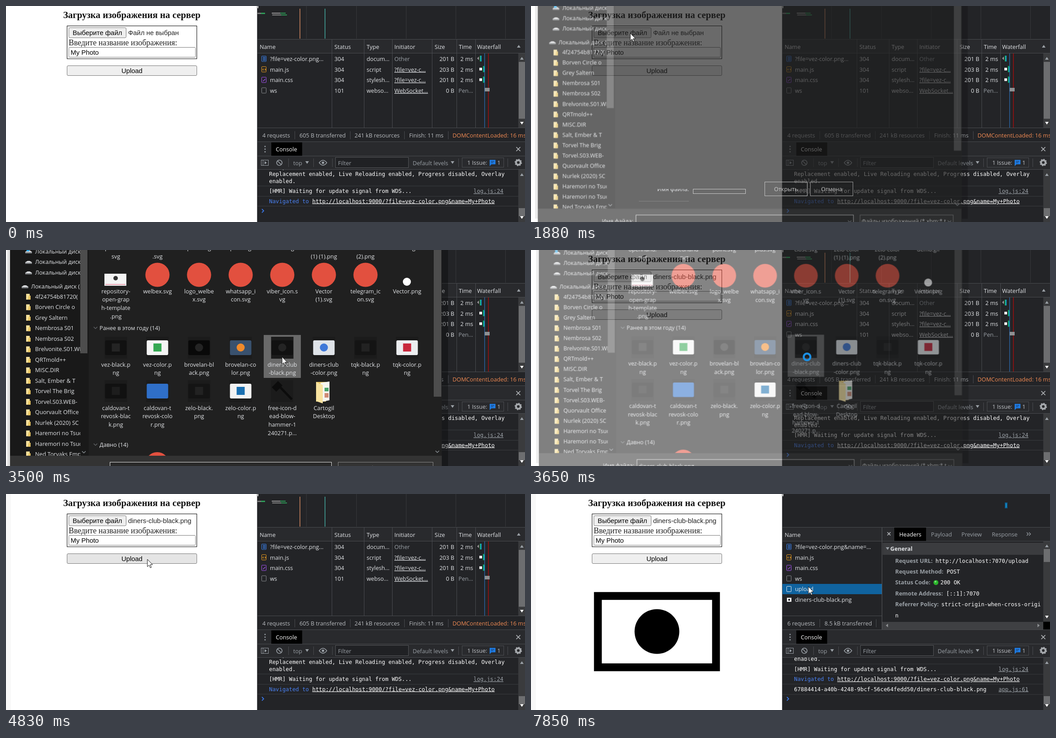
Write an HTML page that moves like this. It is 1160 by 483 pixels and loops after 8000 ms.

```html
<!DOCTYPE html>
<html lang="ru">
<head>
<meta charset="utf-8">
<title>Загрузка изображения</title>
<style>
html, body { margin: 0; width: 100%; height: 100%; overflow: hidden; background: #fff; }
svg { display: block; width: 100vw; height: 100vh; }
text { white-space: pre; }
.ui { font: 12.7px "Open Sans", "Noto Sans", sans-serif; }
.mono { font: 12.32px "DejaVu Sans Mono", monospace; }
.form { font: 14.88px "Liberation Sans", Arial, sans-serif; }
.serif { font: 17.86px "Liberation Serif", serif; }
.title { font: bold 20.9px "Liberation Serif", serif; }
.bold { font-weight: 700; }
.link { text-decoration: underline; }
</style>
</head>
<body>
<svg id="stage" viewBox="0 0 1160 483" xmlns="http://www.w3.org/2000/svg"></svg>
<script>
const LOOP = 8000;
const BG = '#232427', BAR = '#292a2d', LINE = '#4a4c50', TEXT = '#e3e5e8', DIM = '#9aa0a6';

// Drawing helpers
const rect = (x, y, w, h, fill, more = '') => `<rect x="${x}" y="${y}" width="${w}" height="${h}" fill="${fill}" ${more}/>`;
const box = (x, y, w, h, stroke, fill = 'none', r = 0, more = '') => rect(x, y, w, h, fill, `stroke="${stroke}" rx="${r}" ${more}`);
const path = (d, fill, more = '') => `<path d="${d}" fill="${fill}" ${more}/>`;
const stroke = (d, color, width = 1) => path(d, 'none', `stroke="${color}" stroke-width="${width}"`);
const disc = (x, y, r, fill, more = '') => `<circle cx="${x}" cy="${y}" r="${r}" fill="${fill}" ${more}/>`;
const text = (x, y, str, fill = TEXT, cls = 'ui', anchor = 'start') =>
  `<text x="${x}" y="${y}" fill="${fill}" class="${cls}" text-anchor="${anchor}">${str}</text>`;
const group = (id, body) => `<g id="${id}">${body}</g>`;
const clipped = (id, body) => `<g clip-path="url(#${id})">${body}</g>`;
const down = (x, y, fill = DIM) => path(`M${x - 4} ${y - 3}h8l-4 6z`, fill);
const up = (x, y, fill = DIM) => path(`M${x - 4} ${y + 3}h8l-4 -6z`, fill);
const chevron = (x, y, color = DIM) => stroke(`M${x - 4} ${y - 2}l4 4 4 -4`, color, 1.2);
const vlines = (xs, y, h, color = LINE) => stroke(xs.map(x => `M${x}.5 ${y}v${h}`).join(''), color);
const hlines = (ys, x, w, color = LINE) => stroke(ys.map(y => `M${x} ${y}.5h${w}`).join(''), color);
const cross = (x, y, r = 4.5) => stroke(`M${x - r} ${y - r}l${2 * r} ${2 * r}m0 ${-2 * r}l${-2 * r} ${2 * r}`, '#b5b8bc', 1.7);
const scrollbar = (y, h, thumbY, thumbH) =>
  rect(1145, y, 15, h, '#3a3b3d') + rect(1146, thumbY, 14, thumbH, '#6d6e70') + up(1153, y + 11) + down(1153, y + h - 10, '#fff');

// Left: the upload form
const page = rect(0, 0, 562, 483, '#fff') + group('edge', rect(0, 0, 11, 483, '#f8f8f8')) +
  text(127.7, 27, 'Загрузка изображения на сервер', '#111', 'title') +
  box(136.5, 44.5, 290, 73.5, '#000') +
  box(140.5, 48.5, 128, 22.5, '#767676', '#efefef', 2.5, 'id="choose"') +
  text(149, 65, 'Выберите файл', '#000', 'form') +
  group('noFile', text(273, 65, 'Файл не выбран', '#222', 'form')) +
  group('picked', text(273, 65, 'diners-club-black.png', '#222', 'form')) +
  text(140, 87.5, 'Введите название изображения:', '#222', 'serif') +
  box(140.5, 92.5, 283, 22, '#767676', '#fff', 2) + text(144.5, 109, 'My Photo', '#000', 'form') +
  box(136.5, 133.5, 290, 22, '#767676', '#efefef', 2.5, 'id="send"') +
  text(281.5, 150, 'Upload', '#000', 'form', 'middle') +
  group('image', rect(149.5, 228, 264, 159.5, '#fff', 'stroke="#000" stroke-width="17.5"') + disc(281.5, 307.5, 50, '#000'));

// Right: network panel
const rowY = i => 118.5 + i * 23.6;
const fileIcon = i => {
  const y = rowY(i) - 6.5, color = ['#3b82f0', '#f0a020', '#a855f7', '#8a8d91', '#8a8d91', '#fff'][i];
  if (i === 5) return rect(572, y + 2, 10, 9, '#fff') + rect(575, y + 4.5, 4, 4, BG);
  const detail = ['M574 3.5h6M574 6.5h6M574 9.5h6', 'M575.5 5l-1.5 2 1.5 2M578.5 5l1.5 2 -1.5 2', 'M574.5 9.5l5 -5'][i];
  return box(571.5, y, 10, 12, color, 'none', 1) +
    (detail ? `<g transform="translate(0 ${y - .5})">${stroke(detail, color, 1.3)}</g>` : '');
};
const names = ['?file=vez-color.png...', 'main.js', 'main.css', 'ws', 'upload', 'diners-club-black.png'];
const nameCell = (i, label = names[i]) => fileIcon(i) + text(590, rowY(i) + 4.5, label);
const rows = [
  ['304', 'docum...', 'Other', '201 B', '2 ms'],
  ['304', 'script', '?file=vez-c...', '203 B', '2 ms'],
  ['304', 'stylesh...', '?file=vez-c...', '201 B', '2 ms'],
  ['101', 'webso...', 'WebSocket...', '0 B', 'Pen...'],
  ['200', 'xhr', 'app.js:67', '254 B', '3 ms'],
  ['200', 'png', 'app.js:62', '7.6 kB', '2 ms']
];
const row = ([status, type, from, size, time], i) => {
  const y = rowY(i) + 4.5, other = from === 'Other';
  return nameCell(i) + text(734, y, status) + text(806, y, type) +
    text(868, y, from, other ? DIM : TEXT, other ? 'ui' : 'ui link') +
    text(1002, y, size, TEXT, 'ui', 'end') + text(1044, y, time, i === 3 ? DIM : TEXT, 'ui', 'end');
};
const summary = (...parts) => parts.map(([x, label, sep]) =>
  text(x, 294, label, label.startsWith('DOM') ? '#f28b54' : '#b9bcc0') + (sep ? vlines([sep], 280, 18) : '')).join('');

const overviewBefore = vlines([671, 783, 894, 1005, 1116], 0, 73, '#38393c') +
  rect(656, 6, 2, 67, '#a86f52') + rect(712, 6, 2, 67, '#3c8a84') +
  rect(562, 15, 8, 3, '#777') + rect(570, 15, 9, 3, '#2e9b57') +
  rect(594, 15, 19, 2, '#999') + rect(595, 19, 20, 2, '#888') + rect(613, 15, 12, 2, '#2e9b57') + rect(615, 19, 13, 2, '#2e9b57');
const waterfallBefore = rect(1069, 106, 1.5, 167, '#2a629f') + rect(1077.5, 106, 1.5, 167, '#a30d0d') +
  path('M1053 117l4 -4v8z', '#999') + rect(1059, 111, 2, 13, '#1bb16a') + rect(1061, 111, 2, 13, '#1593c9') +
  [1, 2].map(i => rect(1058, rowY(i) - 4, 6, 6, '#fff') + rect(1066, rowY(i) - 8, 3, 14, '#12a86b') + rect(1068, rowY(i) - 6, 2, 11, '#1593c9')).join('') +
  rect(1070, 183, 11, 8, '#8e9092');
const before = overviewBefore + rows.slice(0, 4).map(row).join('') + waterfallBefore +
  summary([573, '4 requests', 645], [656, '605 B transferred', 769], [779, '241 kB resources', 890],
    [901, 'Finish: 11 ms', 988], [998, 'DOMContentLoaded: 16 ms']);
const after = vlines([692, 823, 954, 1085], 0, 73, '#38393c') + rect(562, 5, 2, 68, '#3f8a82') + rows.map(row).join('') +
  rect(1053.5, 106, 2, 167, '#a30d0d') +
  [0, 1, 2].map(i => rect(1053, rowY(i) - 4, 3, 6, '#6b6d70') + rect(1058.5, rowY(i) - 8, 2.5, 13, '#1593c9')).join('') +
  [4, 5].map(i => rect(1140, rowY(i) - 5, 2, 6, '#ddd')).join('') +
  summary([573, '6 requests', 645], [656, '8.5 kB transferred', 771], [782, '248 kB resources', 893],
    [903, 'Finish: 19.08 s', 996], [1006, 'DOMContentLoaded: 16 ms']);

const headers = [['Request URL:', 904, 'http://localhost:7070/upload'], ['Request Method:', 929, 'POST'],
  ['Status Code:', 915, '200 OK'], ['Remote Address:', 928, '[::1]:7070'],
  ['Referrer Policy:', 917, 'strict-origin-when-cross-origi'], ['', 814, 'n']];
const details = rect(562, 75, 598, 228, BG) + rect(562, 75, 598, 30, BAR) +
  rect(562, 201, 222, 23, '#10639f') + text(567, 95.5, 'Name') +
  names.map((n, i) => nameCell(i, i ? n : '?file=vez-color.png&amp;name=...')).join('') + box(571.5, 206.5, 10, 12, '#dfe9f2', 'none', 1) +
  summary([573, '6 requests', 645], [656, '8.5 kB transferred', 771]) +
  rect(812, 75, 71, 30, '#000') + cross(800, 89, 3.5) +
  [['Headers', 823], ['Payload', 894], ['Preview', 962], ['Response', 1030]].map(([s, x], i) => text(x, 94.5, s, i ? DIM : '#fff')).join('') +
  stroke('M1108 86l3.5 3.5 -3.5 3.5M1113 86l3.5 3.5 -3.5 3.5', DIM, 1.4) +
  rect(786, 109, 359, 27, '#3b3c3f') + down(797, 122) + text(803, 127, 'General', TEXT, 'ui bold') +
  headers.map(([key, x, value], i) => text(814, 153.5 + i * 24.4, key, DIM, 'ui bold') + text(x, 153.5 + i * 24.4, value, '#fff', 'mono')).join('') +
  disc(905, 198, 5.5, '#2bb52b') + disc(904, 196, 2, '#7be27b') +
  scrollbar(105, 180, 123, 29) + rect(785, 286, 360, 17, '#3f4043') + rect(1145, 286, 15, 17, '#000') +
  path('M798 290v8l-5 -4zM1132 290v8l5 -4z', '#8d8f92') + vlines([784], 75, 228, '#5a5c5f') +
  hlines([74, 105], 562, 598) + hlines([272], 562, 222) + rect(1059, 19, 6, 13, '#0d5b8e') + rect(1061, 21, 2, 9, '#1593c9');

// Right: console drawer
const consoleLog = text(588, 364, '[webpack-dev-server] Server started: Hot Module', '#fff', 'mono') +
  text(588, 380, 'Replacement enabled, Live Reloading enabled, Progress disabled, Overlay', '#fff', 'mono') +
  text(588, 395.5, 'enabled.', '#fff', 'mono') + hlines([402, 425, 447], 562, 583, '#3a3c3f') +
  text(588, 418, '[HMR] Waiting for update signal from WDS...', '#fff', 'mono') + text(1045, 418, 'log.js:24', DIM, 'mono link') +
  text(588, 440.5, 'Navigated to', '#4a80f0', 'mono') +
  text(684.5, 440.5, 'http://localhost:9000/?file=vez-color.png&amp;name=My+Photo', '#fff', 'mono link') +
  group('answer', text(588, 463, '67884414-a40b-4248-9bcf-56ce64fedd50/diners-club-black.png', '#fff', 'mono') +
    text(1045, 463, 'app.js:61', DIM, 'mono link') + hlines([470], 562, 583, '#3a3c3f'));
const gear = disc(1145, 350, 5, 'none', 'stroke="#a5a8ac" stroke-width="4"') +
  disc(1145, 350, 7, 'none', 'stroke="#a5a8ac" stroke-width="2.5" stroke-dasharray="2.75 2.75"');
const drawer = rect(562, 303, 598, 180, BG) + rect(562, 304, 598, 61, BAR) +
  clipped('log', group('log-lines', consoleLog)) + stroke('M572 454l4 4 -4 4', '#3b78e7', 1.8) +
  scrollbar(366, 117, 452, 18) + hlines([303, 335, 365], 562, 598) +
  [314, 320, 326].map(y => disc(579, y, 1.5, DIM)).join('') + rect(593, 305, 69, 30, '#000') + text(603, 325, 'Console', '#fff') + cross(1145, 320) +
  box(570.5, 344.5, 16, 12, DIM) + path('M578 347l5 3.5 -5 3.5z', DIM) + vlines([574], 345, 12, DIM) +
  disc(611, 350.5, 6, 'none', `stroke="${DIM}" stroke-width="1.7"`) + stroke('M607 346.5l8 8', DIM, 1.7) +
  vlines([631, 687, 729, 1011, 1121], 341, 19) + text(642, 355.5, 'top', DIM) + down(673, 350) + down(998, 350) +
  stroke('M700 350.5q8.5 -11 17 0q-8.5 11 -17 0z', DIM, 1.6) + disc(708.5, 350.5, 2.8, DIM) +
  box(736.5, 338.5, 163, 23, '#55575a', '#202124') + text(742, 355.5, 'Filter', DIM) + text(909, 355.5, 'Default levels', DIM) +
  box(1019.5, 339.5, 93, 21, '#4c4e52') + text(1031, 355, '1 Issue:', '#c3c6ca') + text(1098, 355, '1', '#c3c6ca') +
  path('M1081 344h13v10h-9l-4 4z', '#1f7ae0') + stroke('M1084 347.5h7M1084 350.5h5', '#16345e') + gear;

const devtools = rect(562, 0, 598, 483, BG) + rect(562, 75, 598, 30, BAR) + rect(562, 0, 2, 5, '#ddd') +
  group('hover', rect(562, 177.5, 583, 23, '#333e4a')) +
  [['Name', 567], ['Status', 734], ['Type', 806], ['Initiator', 868], ['Size', 958], ['Time', 1012], ['Waterfall', 1053]].map(([s, x]) => text(x, 95.5, s)).join('') +
  up(1146, 90) + vlines([728, 800, 863, 952, 1007, 1049], 75, 198) + group('before', before) + group('after', after) +
  hlines([74, 105, 272], 562, 598) + scrollbar(106, 166, 125, 127) + group('details', details) + drawer + vlines([561], 0, 483, '#55575a');

// File chooser; its background reaches above the stage so that it still covers it when scaled
const TOP = -20;
const folders = ['4f24754b81720(', 'Borven Circle o', 'Grey Saltern', 'Nembrosa S01', 'Nembrosa S02', 'Brelvonite.S01.WE', 'QRTmold++',
  'MISC.DIR', 'Salt, Ember &amp; T', 'Torvel The Brig', 'Torvel.S03.WEB-', 'Quorvault Office', 'Nurlek (2020) SC',
  'Haremori no Tsuda', 'Haremori no Tsuda', 'Ned Torvaks Empiri'];
const drive = (x, y) => path(`M${x - 7} ${y + 1}l5 -3h5l5 3v1h-15z`, '#e4e6e8') + rect(x - 7, y + 1.5, 15, 3, '#85888b');
const folder = (x, y) => rect(x, y - 6, 8, 13, '#f7e09a') + path(`M${x + 6} ${y - 2}h4v9h-6z`, '#e6c25e');
const sidebar = rect(9, TOP, 176, 460 - TOP, '#191919') + clipped('side',
  [3, 26.5, 50].map(y => drive(50, y) + text(65, y + 4.5, 'Локальный диск')).join('') + rect(46, -3, 6, 6, '#2aa7e8') +
  drive(42, 81) + text(56, 85.5, 'Локальный диск (') +
  folders.map((name, i) => folder(45, 104 + i * 23.5) + text(65, 108.5 + i * 23.5, name)).join('')) +
  rect(166, TOP, 16, 231 - TOP, '#4d4d4d') + chevron(174, 452);

const colX = i => 245.5 + i * 93;
const label = (i, y, ...lines) => lines.map((s, n) => text(colX(i), y + 4.5 + n * 18.7, s, TEXT, 'ui', 'middle')).join('');
const labels = (y, list) => list.map((lines, i) => label(i, y, ...lines)).join('');
const card = (i, y, fill, mark, round) => rect(colX(i) - 25, y - 24, 50, 49, '#1b1b1b') +
  rect(colX(i) - 24, y - 16, 48, 33, fill, 'rx="3"') +
  (mark ? round ? disc(colX(i), y, 9, mark) : rect(colX(i) - 9, y - 9, 18, 18, mark) : '');
const cell = (id, i, y, h) => rect(colX(i) - 41.5, y, 83, h, '#4b4b4b', `id="${id}"`);
const cards = [
  ['#111', '#242424'], ['#f4f4f4', '#35a853'], ['#090909', '#242424', 1], ['#39516e', '#f08a2b', 1],
  ['#111', '#242424', 1], ['#dfe3e8', '#3f78d8', 1], ['#141414', '#222'], ['#eceef0', '#c8283c']
].map((c, i) => card(i, 218, ...c)).join('') +
  [['#111', '#1d1d1d'], ['#2f6fc8'], ['#141414', '#222'], ['#f2f2f2', '#1a6fb0']].map((c, i) => card(i, 315, ...c)).join('');
const section = (y, s) => chevron(200, y, '#6a6d70') + text(209, y + 4.5, s);
const hammer = rect(592, 291, 50, 49, '#1b1b1b') + path('M594 307l14 -14 10 10 -14 14z', '#0c0c0c') + stroke('M613 307l26 27', '#0c0c0c', 5);
const fullFolder = path('M693 295h22v44h-22z', '#e9c766') + path('M703 297l20 -3v42l-20 4z', '#f5f5f0') + path('M693 295l15 7v41l-15 -5z', '#f8e3a0') +
  rect(712, 308, 9, 8, '#4ba36a') + rect(712, 320, 9, 10, '#cf8c77');
const files = cell('hover1', 0, 26, 134) + cell('hover2', 1, 26, 78) + cell('hover3', 3, 190, 96) + cell('hover4', 4, 190, 96) +
  labels(-4.7, [['openhand.', 'svg'], ['closedhand', '.svg'], ['point.svg'], ['plus.svg'], ['close.svg'],
    ['zelo-color', '(1) (1).png'], ['zelo-color', '(2).png'], ['demo.gif']]) +
  rect(220, 53, 49, 27, '#f4f4f4') + disc(245, 63, 5, '#333') + rect(222, 76, 45, 2, '#e8a0b0') +
  [1, 2, 3, 4, 5, 6].map(i => disc(colX(i), 55.5, 27, '#e2503f')).join('') + disc(896, 71, 9, '#fff') +
  labels(92, [['repository-', 'open-grap', 'h-template', '.png'], ['welbex.svg'], ['logo_welbe', 'x.svg'], ['whatsapp_i', 'con.svg'],
    ['viber_icon.s', 'vg'], ['Vector', '(1).svg'], ['telegram_ic', 'on.svg'], ['Vector.png']]) +
  section(174, 'Ранее в этом году (14)') + cards + hammer + fullFolder +
  labels(256, [['vez-black.p', 'ng'], ['vez-color.p', 'ng'], ['brovelan-bl', 'ack.png'], ['brovelan-co', 'lor.png'],
    ['diners-club', '-black.png'], ['diners-club', '-color.png'], ['tqk-black.p', 'ng'], ['tqk-color.p', 'ng']]) +
  labels(353, [['caldovan-t', 'revosk-blac', 'k.png'], ['caldovan-t', 'revosk-colo', 'r.png'], ['zelo-black.', 'png'], ['zelo-color.p', 'ng'],
    ['free-icon-d', 'ead-blow-', 'hammer-1', '240271.p...'], ['Cartogil', 'Desktop']]) +
  section(435, 'Давно (14)') + group('late', clipped('main', disc(338, 479, 27, '#e2503f')));

const dialog = rect(3, TOP, 6, 503, '#000', 'opacity=".12"') + rect(974, TOP, 14, 503, '#000', 'opacity=".3"') +
  rect(9, TOP, 965, 520, '#202020') + sidebar + group('files', files) +
  rect(956, TOP, 17, 328 - TOP, '#4d4d4d') + chevron(964, 451) +
  rect(9, 460, 965, 40, '#333') + text(155, 493, 'Имя файла:') + box(232.5, 474.5, 495, 24, '#e6e6e6', '#292929') +
  box(742.5, 474.5, 212, 24, '#8a8a8a', '#333') + text(746, 493, 'Файлы изображений (*.xbm;*.t') +
  chevron(719, 489) + chevron(946, 489) + group('fileName', text(236, 494, 'diners-club-black.png'));
const ghost = box(522.5, 393.5, 95, 31, '#c4c4c4') + box(624.5, 393.5, 95, 31, '#a0a0a0') +
  text(570, 414, 'Открыть', '#ccc', 'ui', 'middle') + text(672, 414, 'Отмена', '#bbb', 'ui', 'middle') +
  clipped('strip', text(282, 414, 'Имя файла:')) + box(362.5, 409.5, 117, 10, '#ccc') + hlines([436], 241, 112, '#888');

const clip = (id, ...r) => `<clipPath id="${id}">${rect(...r, '#000')}</clipPath>`;
document.getElementById('stage').innerHTML =
  clip('log', 562, 366, 583, 117) + clip('side', 9, TOP, 157, 460 - TOP) + clip('main', 185, 0, 770, 460) + clip('strip', 241, 409, 120, 20) +
  page + devtools + group('veil', rect(140, 0, 441, 483, '#202020')) + group('dialog', dialog) + group('ghost', ghost) +
  group('ring', disc(617, 239, 7.5, 'none', 'stroke="#1c8fe3" stroke-width="4.5"')) +
  group('cursor', path('M0 0V16.5L3.8 13 6.5 19 9 18 6.3 12H11.5Z', '#fff', 'stroke="#111"'));

// Motion: every track is a table of [time, value] with hard changes
function track(id, prop, table) {
  const frames = table.map(([t, v]) => ({ offset: t / LOOP, [prop]: v, easing: 'steps(1, end)' }));
  frames.push({ offset: 1, [prop]: table.at(-1)[1] });
  document.getElementById(id).animate(frames, { duration: LOOP, iterations: Infinity });
}
const show = (id, from, to) =>
  track(id, 'opacity', [...(from ? [[0, 0]] : []), [from, 1], ...(to ? [[to, 0]] : [])]);

[['edge', 3770], ['noFile', 0, 3650], ['picked', 3650], ['image', 5590], ['before', 0, 5470], ['after', 5470, 7850],
  ['details', 7850], ['answer', 5590], ['hover', 6880, 7850], ['files', 2030], ['late', 2400], ['fileName', 2910],
  ['hover1', 2030, 2400], ['hover2', 2400, 2520], ['hover3', 2520, 2760], ['hover4', 2760],
  ['ghost', 1880, 2030], ['ring', 3650, 4170]].forEach(args => show(...args));

track('veil', 'opacity', [[0, 0], [1610, .05], [1730, .13], [1880, 0]]);
track('dialog', 'opacity', [[0, 0], [1880, .67], [2030, 1], [3650, .55], [3770, 0]]);
track('dialog', 'transform', [[0, 'matrix(.982, 0, 0, .982, 6.2, 1.4)'], [2030, 'none'], [3650, 'matrix(.981, 0, 0, .981, 8.6, 3)']]);
track('hover4', 'fill', [[0, '#4b4b4b'], [2910, '#5c5c5c'], [3500, '#696969']]);
track('hover', 'transform', [[0, 'none'], [7150, 'translate(0px, 23.5px)']]);
track('log-lines', 'transform', [[0, 'none'], [5590, 'translate(0px, -22.4px)']]);
track('choose', 'fill', [[0, '#efefef'], [780, '#e5e5e5'], [1490, '#f5f5f5'], [1610, '#e5e5e5'], [4320, '#efefef']]);
track('send', 'fill', [[0, '#efefef'], [510, '#e5e5e5'], [630, '#efefef'], [4710, '#e5e5e5'],
  [5350, '#f5f5f5'], [5470, '#e5e5e5'], [6640, '#efefef']]);
track('cursor', 'opacity', [[0, 0], [120, 1], [3650, 0], [4170, 1]]);
track('cursor', 'transform', [
  [0, 173, 408], [240, 212, 225], [390, 240, 165], [510, 234, 140], [630, 228, 80], [780, 224, 68], [900, 222, 61],
  [2400, 330, 110], [2520, 500, 192], [2640, 567, 196], [2760, 613, 224], [2910, 617, 239],
  [4320, 487, 204], [4470, 440, 195], [4590, 390, 180], [4710, 340, 160], [4830, 316, 146],
  [6520, 349, 154], [6640, 450, 170], [6760, 560, 180], [6880, 640, 189], [7030, 628, 198], [7150, 619, 206], [7300, 620, 207]
].map(([t, x, y]) => [t, `translate(${x}px, ${y}px)`]));
</script>
</body>
</html>
```
